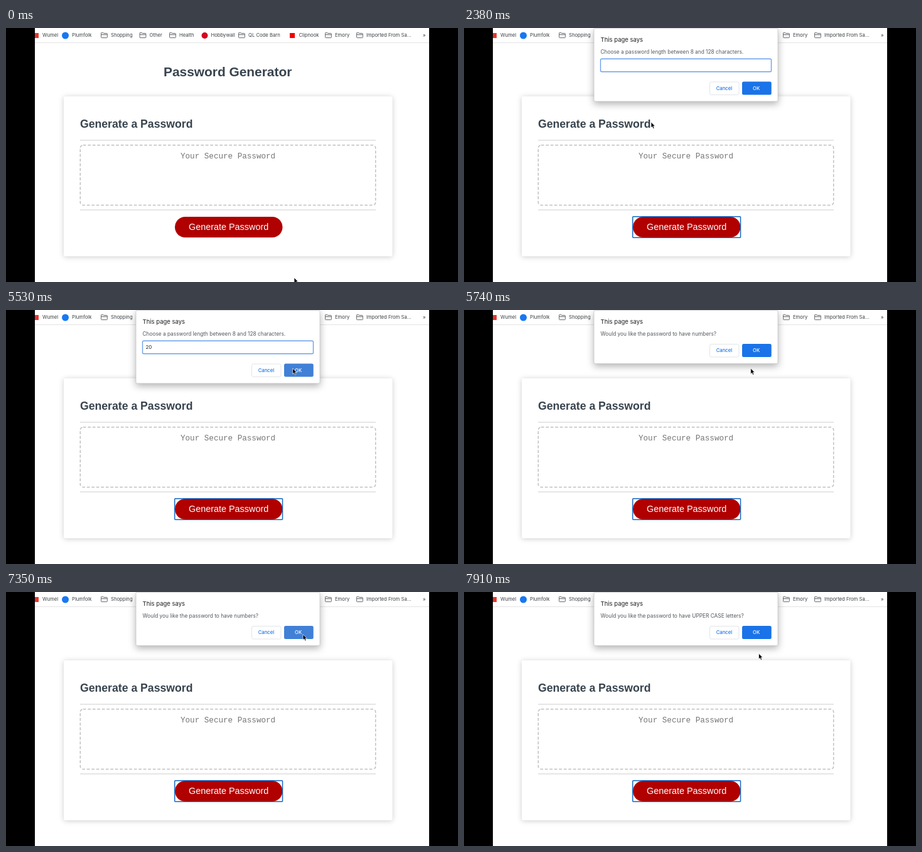
An HTML page that plays this animation: 720 px wide and 405 px high, repeating every 8 s.

```html
<!DOCTYPE html>
<html lang="en">
<head>
<meta charset="utf-8">
<title>Password Generator</title>
<style>
  html, body { margin: 0; width: 100%; height: 100%; overflow: hidden; background: #fff; }
  svg { display: block; }
  text { font-family: Inter, sans-serif; white-space: pre; }
  .page text { font-family: "Liberation Sans", Arial, sans-serif; fill: #38444e; }
  .page .bold { font-weight: 700; }
  .page .mono { font-family: "Liberation Mono", monospace; font-size: 12.6px; fill: #757575; }
  .page .label { font-size: 14.4px; fill: #fff; }
  .card { filter: drop-shadow(0 1px 4px rgba(0, 0, 0, .2)); }
  .sheet { filter: drop-shadow(0 4px 6px rgba(0, 0, 0, .3)); }
  #bookmarks text { font-size: 7.7px; fill: #3c4043; }
  #dialog .small { font-size: 7.7px; font-weight: 500; text-anchor: middle; }
</style>
</head>
<body>
<svg width="720" height="405" viewBox="0 0 720 405">
  <defs>
    <g id="folder" fill="#f1f1f1" stroke="#5f6368" stroke-width=".9">
      <path d="M.5 8.2q0-.9.9-.9h2.4l1.1 1.2h4.6q.9 0 .9.9v5.3q0 .9-.9.9H1.4q-.9 0-.9-.9z"/>
      <path d="M.5 10.4h9.9"/>
    </g>
  </defs>
  <rect width="720" height="405" fill="#fff"/>
  <g id="bookmarks"></g>
  <path d="M46 23.5h628" stroke="#e3e3e3"/>

  <g class="page">
    <text class="bold" x="251" y="77" font-size="20.9">Password Generator</text>
    <rect class="card" x="92" y="109" width="523.5" height="255" rx="3" fill="#fff"/>
    <text class="bold" x="118" y="159.3" font-size="17.65">Generate a Password</text>
    <path d="M118 179h471M118 290h471" stroke="#dedede" stroke-width="1.6"/>
    <rect x="118.3" y="186.8" width="470.4" height="95.6" rx="4.5" fill="none"
          stroke="#c0c0c0" stroke-width="1.5" stroke-dasharray="4.7 2.8"/>
    <text class="mono" x="278" y="208.3">Your Secure Password</text>
    <rect x="269" y="301" width="171.5" height="33" rx="16.5" fill="#b00000"/>
    <text class="label" x="291" y="322">Generate Password</text>
    <rect id="ring" x="268.7" y="300.7" width="171.8" height="33.6" rx="1" fill="none"
          stroke="#1267c4" stroke-width="1.5"/>
  </g>

  <g id="dialog">
    <rect id="sheet" class="sheet" x="207" y=".5" width="293" rx="2" fill="#fff" stroke="#c2c2c2" stroke-width=".7"/>
    <text x="217.5" y="21.5" font-size="9.5" fill="#202124">This page says</text>
    <text id="message" x="217.5" y="40.5" font-size="8.3" fill="#53575c"></text>
    <g id="field">
      <rect x="217.5" y="49.2" width="272" height="20.6" rx="2" fill="#fff" stroke="#6c9fea" stroke-width="1.4"/>
      <text id="typed" x="222.5" y="62" font-size="7.9" fill="#202124"></text>
      <rect id="caret" y="54" width="1" height="10" fill="#202124"/>
    </g>
    <g id="buttons">
      <rect x="391.5" y="54.5" width="46.5" height="20.5" rx="2.5" fill="#fff" stroke="#dfe1e5" stroke-width=".9"/>
      <text class="small" x="414.4" y="67.3" fill="#1a73e8">Cancel</text>
      <rect id="ok" x="443" y="54" width="46.7" height="21" rx="2.5"/>
      <text class="small" x="465.7" y="67.3" fill="#fff">OK</text>
    </g>
  </g>

  <g id="cursor">
    <path id="arrow" d="M0 0V9L2 7.2 3.5 10.4 5.1 9.7 3.7 6.6H6.4Z" fill="#000" stroke="#fff" stroke-width=".7"/>
    <path id="beam" d="M-2-5Q0-5 0-4Q0-5 2-5M0-4V4M-2 5Q0 5 0 4Q0 5 2 5M-1 1H1" fill="none" stroke="#222" stroke-width=".9"/>
    <path id="hand" d="M-1 1Q0-.6 1 1V4.4Q2-.1 0 0M-1 1Q0-.6 1 1V4L5 5Q6 5.3 5.8 7L5 11H-.2L-3 7.4Q-3-.4 0 0L-1 7Z"
          fill="#fff" stroke="#000" stroke-width=".8"/>
  </g>
  <path d="M0 0h46v405H0zM674 0h46v405h-46z"/>
</svg>
<script>
const $ = id => document.getElementById(id);
const LOOP = 8000, STEP = 70;

// label, text x, icon (folder by default)
const bookmarks = [
  ['Wumel', 58, '<rect x="44" y="8" width="8" height="8" fill="#e5382e"/>'],
  ['Plumfolk', 105, '<circle cx="94.5" cy="12" r="5.5" fill="#1877f2"/>'],
  ['Shopping', 167],
  ['Other', 228.5],
  ['Health', 276],
  ['Hobbywall', 326.5, '<circle cx="316.5" cy="12" r="5" fill="#d3081f"/>'],
  ['QL Code Barn', 386],
  ['Clipnook', 466.5, '<rect x="452" y="8" width="8" height="8" fill="#f00000"/>'],
  ['Emory', 524],
  ['Imported From Sa...', 574],
  ['»', 664, ' ']
];
$('bookmarks').innerHTML = bookmarks.map(([label, x, icon]) =>
  (icon || `<use href="#folder" x="${x - 16}"/>`) + `<text x="${x}" y="14.4">${label}</text>`).join('');

// start time, sheet height, message
const dialogs = [
  [1890, 116.5, 'Choose a password length between 8 and 128 characters.'],
  [5600, 85, 'Would you like the password to have numbers?'],
  [7490, 85, 'Would you like the password to have UPPER CASE letters?']
];

// time, x, y of the pointer
const path = [
  [0, 459, 398], [140, 401, 342], [210, 401, 342], [420, 355, 318], [2100, 355, 318],
  [2380, 298, 150], [2870, 273, 62], [4550, 273, 62], [5390, 456.7, 93], [6160, 456.7, 93],
  [6510, 461, 92], [7000, 468, 63], [7350, 473, 67.5], [7490, 473, 67.5], [7910, 469.5, 98], [LOOP, 469.5, 98]
];

function pointerAt(t) {
  const i = path.findIndex(p => p[0] > t);
  const [t0, x0, y0] = path[i - 1], [t1, x1, y1] = path[i];
  const u = (t - t0) / (t1 - t0), e = u * u * (3 - 2 * u);
  return [x0 + (x1 - x0) * e, y0 + (y1 - y0) * e];
}

const show = (id, on) => $(id).setAttribute('visibility', on ? 'inherit' : 'hidden');
const inside = (x, y, left, top, right, bottom) => x > left && x < right && y > top && y < bottom;

function draw(t) {
  const [x, y] = pointerAt(t);
  const dialog = dialogs.filter(d => d[0] <= t).pop();
  const prompt = dialog === dialogs[0];
  show('dialog', dialog);
  show('ring', dialog);
  show('field', prompt);

  if (dialog) {
    const shift = prompt ? 31.5 : 0;
    $('sheet').setAttribute('height', dialog[1]);
    $('message').textContent = dialog[2];
    $('buttons').setAttribute('transform', `translate(0 ${shift})`);
    $('ok').setAttribute('fill', inside(x, y, 443, 54 + shift, 490, 75 + shift) ? '#4080d6' : '#1a73e8');
  }
  if (prompt) {
    const count = t < 3220 ? 0 : t < 3290 ? 1 : 2;
    $('typed').textContent = '20'.slice(0, count);
    $('caret').setAttribute('x', 222 + count * 5);
    show('caret', Math.floor((t - 1790) / 530) % 2 === 0);
  }

  const hand = inside(x, y, 269, 301, 440, 334);
  const beam = prompt && inside(x, y, 217, 49, 490, 70);
  show('hand', hand);
  show('beam', beam);
  show('arrow', !hand && !beam);
  $('cursor').setAttribute('transform', `translate(${x} ${y})`);
}

const start = performance.now();
function tick() {
  const t = (performance.now() - start) % LOOP;
  draw(Math.floor(t / STEP) * STEP);
  requestAnimationFrame(tick);
}
tick();
</script>
</body>
</html>
```
